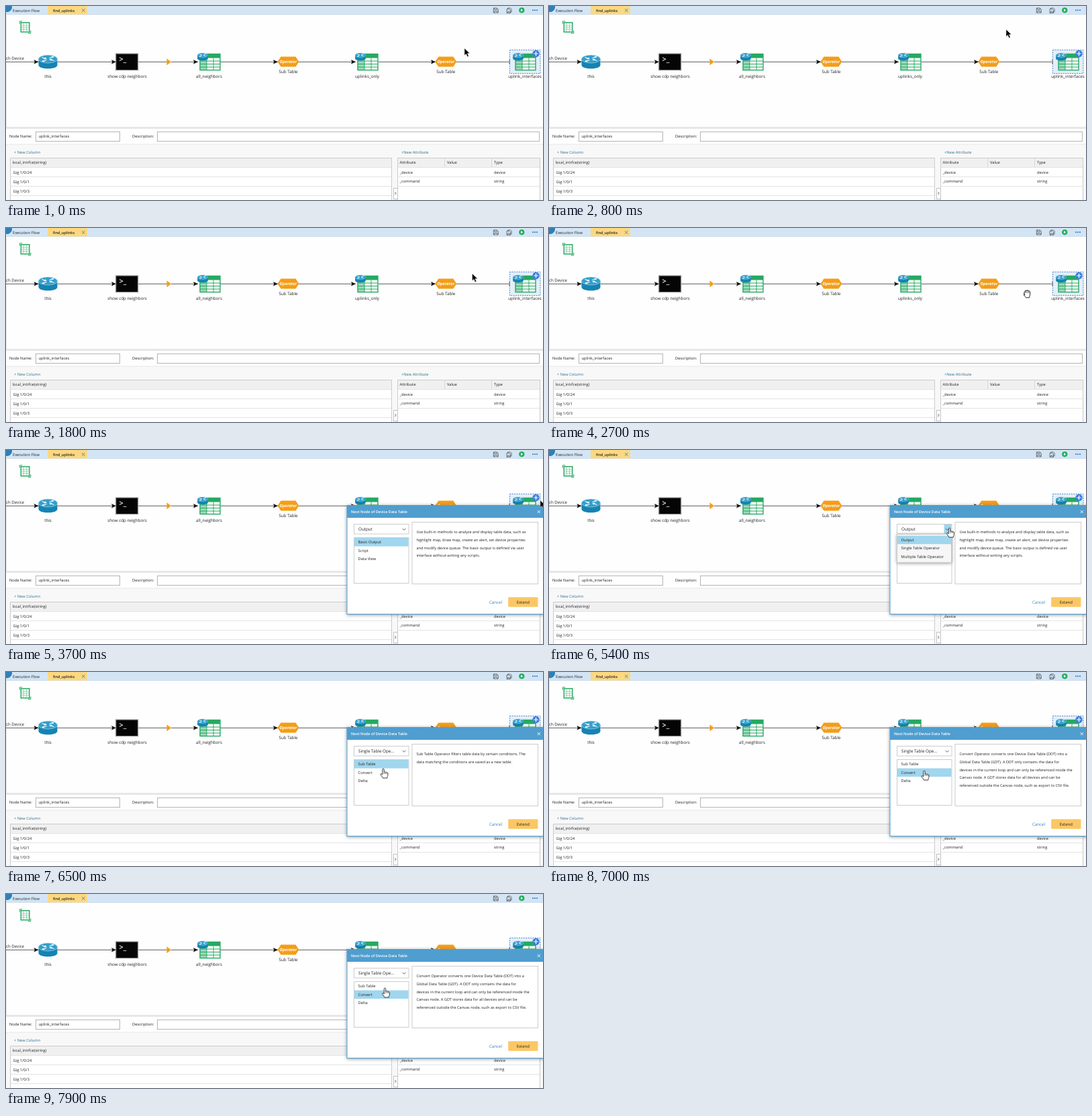
Animation of 800 by 289 pixels, one loop 8 s. Source, as an HTML page:

```html
<!DOCTYPE html>
<html lang="en">
<head>
<meta charset="utf-8">
<title>Execution flow editor</title>
<style>
html, body { margin: 0; width: 100%; height: 100%; overflow: hidden; background: #fff; }
svg { display: block; width: 800px; height: 289px; }
text { font-family: "Open Sans", "Noto Sans", sans-serif; text-rendering: geometricPrecision; white-space: pre; }
</style>
</head>
<body>
<svg id="stage" viewBox="0 0 800 289"></svg>
<script>
const ink = '#222', green = '#27a862', orange = '#f49d18', highlight = '#a0d6ee';

const rect = (x, y, w, h, fill, stroke = 'none', more = '') =>
  `<rect x="${x}" y="${y}" width="${w}" height="${h}" fill="${fill}" stroke="${stroke}" ${more}/>`;
const path = (d, fill = 'none', stroke = 'none', width = 1) =>
  `<path d="${d}" fill="${fill}" stroke="${stroke}" stroke-width="${width}"/>`;
const text = (s, x, y, size = 5.78, fill = ink, more = '') =>
  `<text x="${x}" y="${y}" font-size="${size}" fill="${fill}" ${more}>${s}</text>`;
const at = (x, y, body, scale = 1) => `<g transform="translate(${x} ${y}) scale(${scale})">${body}</g>`;
const label = (s, x, y = 106.7) => text(s, x, y, 6.25, ink, 'text-anchor="middle"');
const box = (x, y, w, h, stroke = '#ccc') => rect(x + .5, y + .5, w, h, '#fff', stroke);
const cross = (x, y, r, color) =>
  path(`M${x - r} ${y - r}l${2 * r} ${2 * r}m0 ${-2 * r}l${-2 * r} ${2 * r}`, 'none', color, .9);

// Icons, drawn around their own centre
const router =
  path('M-14-5V4.5C-14 11.5 14 11.5 14 4.5V-5Z', '#1583b3') +
  '<ellipse cy="-4.5" rx="14" ry="6" fill="#329fcb" stroke="#b9deee" stroke-width=".6"/>' +
  path('M-9-7l6 2m-3.2.4l3.4-.3l-1.2-1.9M9-2l-6-2m3.2-.4l-3.4.3l1.2 1.9M2-6l6-2m-3-.3l3.2.2l-1 1.6M-2-3l-6 2m3 .3l-3.2-.2l1-1.6', 'none', '#fff', 1.1);

const grid =
  rect(-14.5, -12, 30, 24, '#fff', green, 'stroke-width="1.4"') +
  rect(-14.5, -12, 30, 6, green) +
  rect(-14.5, -6, 10, 18, green, 'none', 'opacity=".45"') +
  path('M-14.5-1.5H15.5M-14.5 3H15.5M-14.5 7.5H15.5M-4.5-6V12M5.5-6V12', 'none', green, 1);

const startIcon =
  rect(-6, -6.8, 12.5, 14, '#fff', green, 'stroke-width="1.5"') +
  path('M-6-2.5H6.5M-6 .5H6.5M-6 3.5H6.5M-2-6.8V7.2M2.3-6.8V7.2', 'none', '#7fcba0', .8) +
  path('M-8-5V-8.7H-4M8.5 5V9H4.5', 'none', green, 1);

const table = x => at(x, 83.5, grid) + at(x - 10.5, 75.8, router, .56);

const operator = x =>
  path(`M${x - 16} 83L${x - 11} 75.5H${x + 11}L${x + 16} 83L${x + 11} 90.5H${x - 11}Z`, orange) +
  text('Operator', x, 85.2, 6, '#fff', 'text-anchor="middle" font-weight="700" font-style="italic"') +
  label('Sub Table', x, 100.1);

const link = (from, to, head = true) =>
  path(`M${from} 83.3H${to}`, 'none', '#333', .8) +
  (head ? path(`M${to} 83.3l-7-3.2l1.4 3.2l-1.4 3.2Z`, '#111') : '');

const topBar =
  rect(0, 0, 800, 12.5, '#d3e5f5') + path('M0 12.5H800', 'none', '#bdd2e3', .7) +
  path('M0 0H9A8 8 0 0 1 0 9Z', '#2f7fb8') +
  text('Execution Flow', 10, 8.5) +
  rect(62, 0, 59, 12.5, '#fcd881') +
  text('find_uplinks', 70, 8.5, 5.5, ink, 'font-weight="600"') +
  cross(115.3, 6.5, 2.2, '#3d7eae') +
  path('M726.3 3h5l2 2v5h-7zM727.8 3v2.4h3.5v-2.4M727.8 10v-2.5h4v2.5', 'none', '#555', .8) +
  path('M746 4.5h4l1.5 1.5v4.5h-5.5zM747.5 4.5v-1.5h4l1.6 1.6v4.4h-1.6M747.5 10v-2h2.5v2', 'none', '#555', .8) +
  '<circle cx="768.3" cy="6.3" r="4.1" fill="#1fae5c"/>' + path('M767 4.2l3.3 2.1l-3.3 2.1z', '#fff') +
  [785, 788, 791].map(x => `<circle cx="${x}" cy="6.3" r="1" fill="#2a6fc0"/>`).join('');

const flow =
  path('M.5 13V180', 'none', '#ddd', .8) +
  at(28.3, 31.5, startIcon) +
  text('ch Device', 27, 80, 6.1, ink, 'text-anchor="end"') +
  link(0, 48.5) + link(77, 164) + link(197, 240, false) + link(246, 286) +
  link(319, 405) + link(436, 521) + link(555, 640) + link(671, 756) +
  at(62.5, 83.5, router) + label('this', 62.5) +
  rect(163.7, 71, 33, 24.6, '#050505', '#999', 'stroke-width="1.2"') +
  text('&gt;_', 168.5, 82.5, 11, '#fff', 'font-weight="600"') +
  label('show cdp neighbors', 180.5) +
  path('M239.5 78.3l6.5 5l-6.5 5z', orange) +
  table(303.5) + label('all_neighbors', 302.5) +
  operator(420.5) +
  table(538.5) + label('uplinks_only', 538) +
  operator(655.3) +
  rect(750.5, 65.5, 45.5, 35, '#e4eefa', '#3f7fc4', 'stroke-width=".9" stroke-dasharray="2 1.4"') +
  table(773.5) + label('uplink_interfaces', 773) +
  '<circle cx="789.5" cy="71" r="5.2" fill="#3f7fdc"/>' +
  path('M786.3 71h6.4M789.5 67.8v6.4', 'none', '#fff', 1.2);

const panel =
  rect(0, 180, 800, 3, '#e6e7e8') + rect(0, 206, 800, 83, '#f8f8f8') + path('M0 206H800', 'none', '#e2e3e4', .8) +
  text('Node Name:', 5, 196.2) + box(44, 187, 125, 14, '#b5b5b5') + text('uplink_interfaces', 48.5, 196.2) +
  text('Description:', 188, 196.2) + box(225, 187, 569, 14, '#b5b5b5') +
  text('+ New Column', 12, 220.3, 5.75, '#2c7097') +
  box(6, 226, 568, 70) + rect(7, 227, 567, 13, '#f0f0f0') +
  path('M6 240.5H574M6 254.5H574M6 268.5H574M6 282.5H574', 'none', '#dcdcdc', .8) +
  text('local_intrfce(string)', 9.5, 235.3) +
  ['Gig 1/0/24', 'Gig 1/0/1', 'Gig 1/0/3'].map((s, i) => text(s, 10.5, 249.8 + 14 * i)).join('') +
  text('+New Attribute', 589, 220.3, 5.75, '#2c7097') +
  box(583, 226, 212, 70) + rect(584, 227, 211, 13, '#f0f0f0') +
  path('M583 240.5H795M583 254.5H795M583 268.5H795', 'none', '#dcdcdc', .8) +
  path('M653.5 227V240M723.5 227V240', 'none', '#d2d2d2', .8) +
  [['Attribute', 586.5, 235.3], ['Value', 657, 235.3], ['Type', 727, 235.3], ['_device', 586.5, 249.5],
    ['device', 727, 249.5], ['_command', 586.5, 263.3], ['string', 727, 263.3]].map(a => text(...a)).join('') +
  box(577, 271, 6, 16, '#c4c4c4') + path('M579.4 277l1.8 2l-1.8 2', 'none', '#444', .8);

// Dialog
const menu = (items, active, top) => items.map((s, i) =>
  (i === active ? rect(519, top + 12.5 * i, 80.5, 12.5, highlight) : '') +
  text(s, 524.5, top + 8.1 + 12.5 * i)).join('');
const outputs = ['Basic Output', 'Script', 'Data View'];
const operators = ['Sub Table', 'Convert', 'Delta'];
const families = ['Output', 'Single Table Operator', 'Multiple Table Operator'];
const notes = {
  output: ['Use built-in methods to analyze and display table data, such as',
    'highlight map, draw map, create an alert, set device properties',
    'and modify device queue. The basic output is defined via user',
    'interface without writing any scripts.'],
  sub: ['Sub Table Operator filters table data by certain conditions. The',
    'data matching the conditions are saved as a new table.'],
  convert: ['Convert Operator converts one Device Data Table (DDT) into a',
    'Global Data Table (GDT). A DDT only contains the data for',
    'devices in the current loop and can only be referenced inside the',
    'Canvas node. A GDT stores data for all devices and can be',
    'referenced outside the Canvas node, such as export to CSV file.']
};

const frame =
  rect(508, 82.5, 296, 162, '#fff', '#4c9bcd', 'filter="url(#shadow)"') +
  rect(508, 82, 296, 19, '#4f9ecf') +
  text('Next Node of Device Data Table', 514, 93.6, 5.55, '#fff', 'font-weight="600"') +
  cross(793.8, 92, 2.1, '#fff') +
  box(518, 110, 81.5, 14.5) + box(518, 130, 81.5, 68) + box(604.5, 107, 187.5, 92) +
  text('Cancel', 720, 228.6, 6.15, '#2f7fb4') +
  rect(748.2, 219.2, 44.3, 14.6, '#fbc765', 'none', 'rx="1"') +
  text('Extend', 770.3, 228.7, 6, ink, 'text-anchor="middle"');

function dialog(t) {
  if (t < 3600) return '';
  const single = t >= 6200, converted = t >= 6900, open = t >= 5000 && !single;
  const note = converted ? notes.convert : single ? notes.sub : notes.output;
  return frame +
    (open ? rect(588.5, 111, 11, 13.5, highlight) : '') +
    path('M590.8 116.8l2.4 2.5l2.4-2.5', 'none', '#555', .9) +
    text(single ? 'Single Table Ope...' : 'Output', 525, 120.2, 6.28) +
    menu(single ? operators : outputs, converted ? 1 : 0, 131) +
    note.map((s, i) => text(s, 611.4, 124.3 + 11.67 * i, 5.6)).join('') +
    (open ? rect(518.5, 125.5, 81, 42, '#f6f6f6', '#c8c8c8', 'stroke-width=".8" filter="url(#shadow)"') +
      menu(families, t < 5750 ? 0 : 1, 127.7) : '');
}

// Cursors; arrow and pointer have the tip at 0,0
const cursors = {
  arrow: path('M0 0V10.6L2.5 8.3L4.3 12.6L6.2 11.8L4.4 7.6H7.8Z', '#000', '#fff', .4),
  pointer: path('M-1.2 1.2C-1.2-.3 1.2-.3 1.2 1.2V5.3C1.6 4.4 3.3 4.8 3.3 5.6C3.8 4.7 5 5 5.1 6C5.9 5.3 6.9 6 6.9 7V9.6C6.9 11 5.8 12 5.8 14H-.6C-.8 12.4-4.4 9.4-4 8.2C-3.6 7-2 8-1.2 8.9Z', '#fff', '#222', .9) +
    path('M1.2 5.5V8M3.3 6V8M5.1 6.3V8', 'none', '#222', .6),
  grab: path('M-3 1.8L-4.4-1.2C-4.7-2.5-3.2-2.8-2.8-1.6L-2.9-4C-2.8-5.2-1.3-5.2-1-4C-.9-6 .9-6 1-4.2C1.3-5.5 2.8-5.2 2.8-3.6C3.2-4.5 4.6-4.2 4.6-2.8V1.4C4.5 3.2 3.6 4 3.4 5.8H-1.6C-2 3.8-5.4 2-4.8.9C-4.4.2-3.6 1-3 1.8Z', '#fff', '#111', .9) +
    path('M-1-4V-1M1-4V-1M2.8-3.5V-1', 'none', '#111', .6)
};

// Time, x, y of the cursor
const track = [[0, 683, 63], [100, 683, 63], [500, 681, 35], [1200, 681, 35], [2000, 697, 74], [2600, 712, 98],
  [2800, 712, 98], [3000, 757, 90], [3400, 791, 74], [3600, 796, 75], [3800, 796, 75], [4400, 705, 108],
  [4900, 596.5, 116], [5400, 596.5, 116], [5900, 562, 144], [6600, 562, 144], [6800, 559, 147], [7200, 559, 147],
  [7800, 564.5, 140], [8000, 564.5, 140]];

function cursor(t) {
  const i = track.findIndex(k => k[0] > t), [a, x, y] = track[i - 1], [b, u, v] = track[i];
  const p = (t - a) / (b - a), e = p * p * (3 - 2 * p);
  const kind = t < 2100 ? 'arrow' : t < 3000 ? 'grab' : t < 3600 ? 'pointer' : t < 4800 ? 'arrow' : 'pointer';
  return at(x + (u - x) * e, y + (v - y) * e, cursors[kind]);
}

const stage = document.getElementById('stage');
stage.innerHTML =
  '<defs><filter id="shadow" x="-10%" y="-15%" width="120%" height="135%">' +
  '<feDropShadow dx="0" dy="1" stdDeviation="2.6" flood-opacity=".4"/></filter></defs>' +
  rect(0, 0, 800, 289, '#fefefe') + flow + topBar + panel + '<g id="live"></g>';
const live = document.getElementById('live');

function draw(now) {
  const t = now % 8000;
  live.innerHTML = dialog(t) + cursor(t);
  requestAnimationFrame(draw);
}
draw(performance.now());
</script>
</body>
</html>
```
